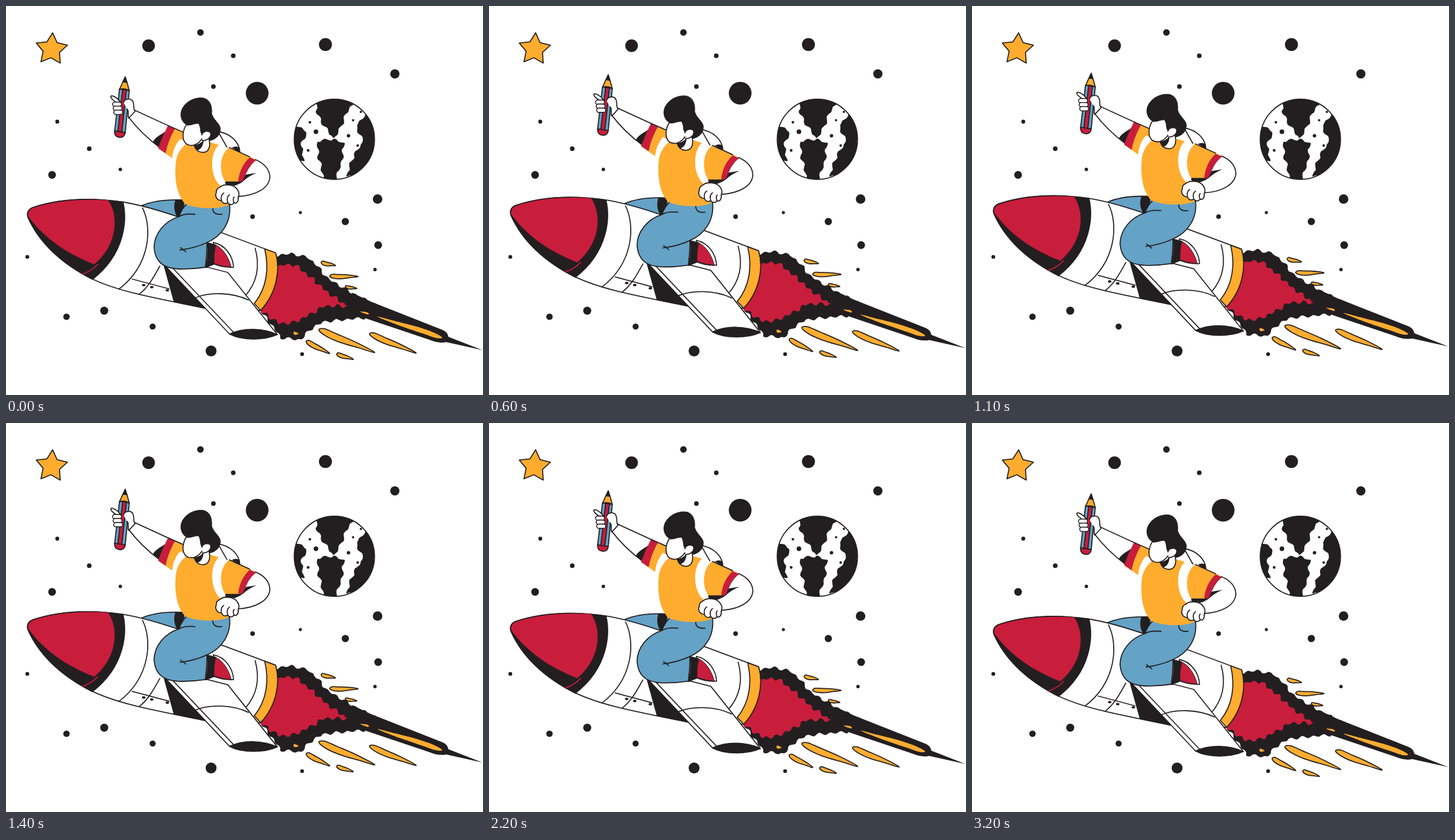
An HTML page with a canvas that plays this animation: 828 px wide and 676 px high, repeating every 3300 ms.

```html
<!DOCTYPE html>
<html lang="en">
<head>
<meta charset="utf-8">
<title>Rocket ride</title>
<style>
  html, body { margin: 0; width: 100%; height: 100%; overflow: hidden; background: #fff; }
  canvas { display: block; }
</style>
</head>
<body>
<canvas id="stage" width="828" height="676"></canvas>
<script>
const ctx = document.getElementById('stage').getContext('2d');
const INK = '#231f20', RED = '#c91d3c', GOLD = '#ffac2f', BLUE = '#64a2c6', WHITE = '#fff';
const LINE = 1.8, TAU = Math.PI * 2;
const LOOP = 3300, TICK = 100, STEP = 1.6, HALF = 10, RISE = 0.9;

function shape(d, fill, line = LINE) {
  const path = d instanceof Path2D ? d : new Path2D(d);
  if (fill) { ctx.fillStyle = fill; ctx.fill(path); }
  if (line) { ctx.lineWidth = line; ctx.strokeStyle = INK; ctx.stroke(path); }
}

function stroke(d, color = INK) {
  ctx.strokeStyle = color;
  ctx.lineWidth = LINE;
  ctx.stroke(new Path2D(d));
}

function dot(x, y, r, flat = 1) {
  ctx.fillStyle = INK;
  ctx.beginPath();
  ctx.ellipse(x, y, r, r * flat, 0, 0, TAU);
  ctx.fill();
}

// Closed smooth curve through points
function smooth(pts) {
  const n = pts.length, path = new Path2D();
  const at = i => pts[(i + n) % n];
  path.moveTo(...pts[0]);
  for (let i = 0; i < n; i++) {
    const a = at(i - 1), b = at(i), c = at(i + 1), d = at(i + 2);
    path.bezierCurveTo(
      b[0] + (c[0] - a[0]) / 6, b[1] + (c[1] - a[1]) / 6,
      c[0] - (d[0] - b[0]) / 6, c[1] - (d[1] - b[1]) / 6, ...c);
  }
  return path;
}

// Closed outline whose sides ripple along their length
function ragged(pts, amp, wave) {
  const out = [];
  let run = 0;
  pts.forEach(([x, y], i) => {
    const [nx, ny] = pts[(i + 1) % pts.length];
    const dx = nx - x, dy = ny - y, len = Math.hypot(dx, dy);
    const count = Math.max(1, Math.round(len * 4 / wave));
    for (let j = 0; j < count; j++) {
      const t = j / count, phase = (run + len * t) / wave * TAU;
      const off = amp * (Math.sin(phase) + 0.4 * Math.sin(phase * 0.61 + 1)) / len;
      out.push([x + dx * t + dy * off, y + dy * t - dx * off]);
    }
    run += len;
  });
  return smooth(out);
}

// Tapering streak with a round head
function streak(x1, y1, x2, y2, width) {
  const dx = x2 - x1, dy = y2 - y1, len = Math.hypot(dx, dy);
  const side = (t, w) => [x1 + dx * t - dy / len * w * width, y1 + dy * t + dx / len * w * width];
  return smooth([side(0, 0), side(0.08, -0.8), side(0.3, -0.75), side(0.65, -0.6), side(1, 0),
    side(0.72, 0.45), side(0.4, 0.9), side(0.15, 0.75)]);
}

function star(x, y, outer, inner, turn) {
  const path = new Path2D();
  for (let i = 0; i < 10; i++) {
    const r = i % 2 ? inner : outer, a = turn + i * TAU / 10;
    path.lineTo(x + r * Math.sin(a), y - r * Math.cos(a));
  }
  path.closePath();
  return path;
}

const dots = [
  [247.5, 69, 11], [337.5, 46, 5.7], [394.5, 86.5, 4], [360, 140, 4], [436, 151.5, 19.7],
  [554.5, 67, 11.3], [675, 118, 8], [89, 201, 3.4], [144.5, 248, 4], [198.5, 284, 3],
  [80, 293.5, 6.7], [645, 335.5, 8.3], [589, 374.5, 6.3], [511, 359, 2.7], [428, 366, 4],
  [646, 415.5, 6.7], [640.5, 458, 3], [37, 436, 3.3], [170.5, 529.5, 7], [105, 540, 5.6],
  [254.5, 557, 5.3], [356, 599.5, 9.5], [514, 605, 3.3]
];
const craters = [
  [616, 184, 2], [602.5, 198.5, 2], [594.5, 225.5, 3], [610.5, 242.5, 2.2],
  [527.5, 202, 2.2], [538, 218.5, 4], [524.5, 251, 2.4]
];
const lands = [
  [[543, 150], [538, 183], [553, 210], [569, 230], [580, 214], [590, 188], [610, 160]],
  [[569, 230], [540, 236], [543, 265], [553, 305], [570, 305], [582, 275], [587, 240]],
  [[490, 200], [508, 209], [522, 220], [512, 244], [518, 268], [490, 275]],
  [[640, 175], [621, 192], [608, 208], [620, 237], [604, 258], [591, 295], [640, 300]]
].map(pts => ragged(pts, 2, 21));

const smoke = ragged([[455, 436], [495, 430], [524, 437], [540, 451], [558, 473], [600, 498], [645, 521],
  [622, 542], [588, 545], [550, 549], [527, 563], [512, 580], [478, 577], [435, 520]], 2, 19);
const fire = ragged([[455, 462], [480, 450], [502, 450], [532, 474], [556, 496], [593, 522],
  [553, 521], [528, 536], [500, 550], [475, 552], [435, 525]], 2.6, 17);
const sparks = [
  streak(547, 446, 572, 451, 4), streak(562, 470, 611, 470, 4.5), streak(589, 488, 609, 491, 3),
  streak(543, 563, 640, 602, 7), streak(521, 583, 562, 604, 5), streak(574, 605, 603, 614, 4),
  streak(631, 570, 712, 603, 6)
];
const embers = [streak(757, 576, 645, 540, 5), streak(630, 535, 615, 531, 2), streak(499, 568, 508, 570, 3)];

function drawSky() {
  dots.forEach(d => dot(...d));
  shape(star(79, 75, 28.5, 15, 0.07), GOLD);

  const globe = new Path2D();
  globe.arc(570, 231.7, 69.7, 0, TAU);
  ctx.save();
  ctx.clip(globe);
  lands.forEach(l => shape(l, INK, 0));
  ctx.restore();
  craters.forEach(c => dot(...c));
  shape(globe);
}

function drawFlame() {
  shape(smoke, INK, 0);
  shape('M600 498L634 514L758 563Q766 566 768 575L827 598L764 584Q752 587 735 580L622 542Z', INK, 0);
  shape(fire, RED, 0);
  embers.forEach(e => shape(e, GOLD, 0));
  sparks.forEach(s => shape(s, GOLD));
}

function drawRocket() {
  shape('M38 367C36 359 39 353 47 350C95 334 150 333 205 341C250 348 320 373 373 393.5L468 429'
    + 'C476 457 468 500 442 529L345 525C250 506 190 495 145 472C95 446 57 410 38 367Z', WHITE);
  shape('M38 367C36 359 39 353 47 350C95 334 150 333 203 340.7C210 370 208 430 150 475'
    + 'C95 447 57 410 38 367Z', INK);
  shape('M39 366C37 359 40 354 47 351C85 338 130 335 177 337.5C194 360 197 412 153 449'
    + 'C108 431 68 406 39 366Z', RED, 0);
  stroke('M132 466Q148 461 159 449', RED);

  stroke('M237 351C254 385 251 450 196 492');
  stroke('M267 452C258 468 248 488 231 501M219 474.5L283 491.5');
  for (const [x, y] of [[239, 485], [253, 488.5], [280, 494]]) dot(x, y, 3, 0.7);

  stroke('M432.5 421C440 448 438 478 415 504');
  shape('M449 422L468 429C477 460 469 500 442 529L431 517C453 490 457 455 449 422Z', GOLD);

  shape('M274 449L292 514L345 525Z', INK);
  shape('M274 449L350 454L385 463L471 571L388 570Z', WHITE);
  stroke('M288 454L395 567M329 507C352 497 392 497 421 511');
  shape('M388 570C412 559 446 559 471 571C449 581 410 582 388 570Z', INK);
}

function drawBackLeg() {
  shape('M233 348C255 338 280 336 306 337L316 344L300 368Z', BLUE);
  shape('M294 337L307 337C313 345 306 354 303 370L297 366C291 356 291 346 294 337Z', INK, 0);
}

function drawFrontLeg() {
  shape('M360 411C381 415 394 435 395 454Q377 455 360 448Z', WHITE);
  shape('M361 414C376 419 387 437 391 454Q375 453 360 447Z', RED, 1);
  shape('M349 411L364 415Q360 432 361 449L346 455Q352 432 349 411Z', INK, 1);
  shape('M314 344C307 350 303 358 300 366C275 374 257 396 257 420C259 443 271 456 300 457'
    + 'C320 457.5 333 456 346 454C348 440 349 425 349 411C372 401 392 378 388 344Z', BLUE);
  stroke('M300 366Q310 360 328 362M349 411Q328 421 302 424M303 420L312 427');
  stroke('M359 350C358 359 364 363 375 362');
}

function drawPencil() {
  shape('M197 144L214 147L207 220L188.5 218Z', BLUE);
  shape('M202.5 145L209 146L201 220L194 219Z', RED);
  shape('M188.5 217L207 220C206 228 200 229 196 228C190 227 188 223 188.5 217Z', RED);
  shape('M197 145L203 131.5L210 132.5L214 147Q206 142 197 145Z', GOLD);
  shape('M207 123L203 131.5L210 132.5Z', INK);
}

function drawRaisedArm() {
  shape('M221 180L284 209L267 246C248 232 227 212 212 192Z', WHITE);
  shape('M277 218C270 223 260 227 255 236L267 246Z', INK, 0);
  drawPencil();
  shape('M204 168C206 160 219 159 221 168C223 175 220 178 224 183L213 195'
    + 'C211 187 214 181 210 179', WHITE);
  shape('M194 169C189 166 181 161 182 157C184 154 194 160 198 166Z', WHITE);
  for (let i = 0; i < 3; i++) {
    const finger = new Path2D();
    finger.roundRect(185 + i, 167 + i * 7, 15.5, 7.5, 3.7);
    shape(finger, WHITE, 1.6);
  }
}

function drawTorso() {
  shape('M368 218C390 222 405 236 406 254L385 248Z', WHITE);
  shape('M392 246Q401 242 406 247L406 255Z', INK, 0);
  shape('M378 300L409 303L405 311L382 312Z', INK, 0);

  shape('M282 208L310 220L352 236L388 247L434 267L405 305L380 305L378 314'
    + 'C390 325 390 338 386 346C367 354 332 353 311 344C295 326 292 298 295 269L265 248Z', GOLD, 0);
  shape('M281 208L293 213.5Q281 235 277 256L264 247Q271 227 281 208Z', RED, 0);
  shape('M302 231L315 238Q298 250 295 270L288 268Q289 246 302 231Z', WHITE, 0);
  shape('M371 240L386 247C371 259 369 288 381 306L374 314C354 299 352 255 371 240Z', WHITE, 0);
  stroke('M388 246L423 262M282 208L307 219');
}

function drawHipArm() {
  shape('M433 267C448 273 458 284 458 298C456 318 432 329 404 331L392 313'
    + 'C402 310 410 306 412 302C416 286 424 275 433 267Z', WHITE);
  shape('M423 263L434 268Q417 281 413 303L403 306Q405 280 423 263Z', RED, 0);
  shape('M410 306L416 293L435 290Q420 296 410 306Z', INK, 0);
  shape('M371 315C377 309 391 310 398 315C404 320 406 327 403 332C404 339 401 344 396 342'
    + 'C392 347 387 345 385 342C379 345 375 342 374 338C367 338 362 332 365 324'
    + 'C365 319 368 316 371 315Z', WHITE);
  stroke('M374 338Q372 329 378 325M385 342Q382 332 388 328M396 342Q393 336 396 332');
}

function drawHead() {
  shape('M333 233L352 230C356 244 352 254 342 254.5C334 254 329 250 327 243Z', WHITE);
  shape('M326 242Q336 241 343 233Q342 248 332 251Z', INK, 0);
  shape('M314 205C306 216 305 231 312 239C322 246 333 241 340 231L352 224L342 200Z', WHITE);
  shape('M315 207C303 202 300 186 308 175C316 163 332 158 343 160C355 163 358 175 357 187'
    + 'C360 198 370 203 372 212C373 223 366 231 354 234L352 228L340 223C336 218 339 211 334 204'
    + 'C327 204 320 208 315 207Z', INK, 1);
  shape('M340 224C342 217 351 216 355 220C357 227 351 234 341 234', WHITE);
}

// Steady rise and fall, advanced in held poses
function lift(time) {
  const tick = Math.floor(time % LOOP / TICK);
  const pose = Math.ceil((tick + 1) / STEP) - 1;
  return RISE * (HALF - Math.abs(pose - HALF));
}

function draw(time) {
  ctx.fillStyle = WHITE;
  ctx.fillRect(0, 0, 828, 676);
  ctx.lineJoin = ctx.lineCap = 'round';
  drawSky();
  ctx.save();
  ctx.translate(0, -lift(time));
  drawFlame();
  drawBackLeg();
  drawRocket();
  drawFrontLeg();
  drawRaisedArm();
  drawTorso();
  drawHipArm();
  drawHead();
  ctx.restore();
}

function loop() {
  draw(performance.now());
  requestAnimationFrame(loop);
}
loop();
</script>
</body>
</html>
```
